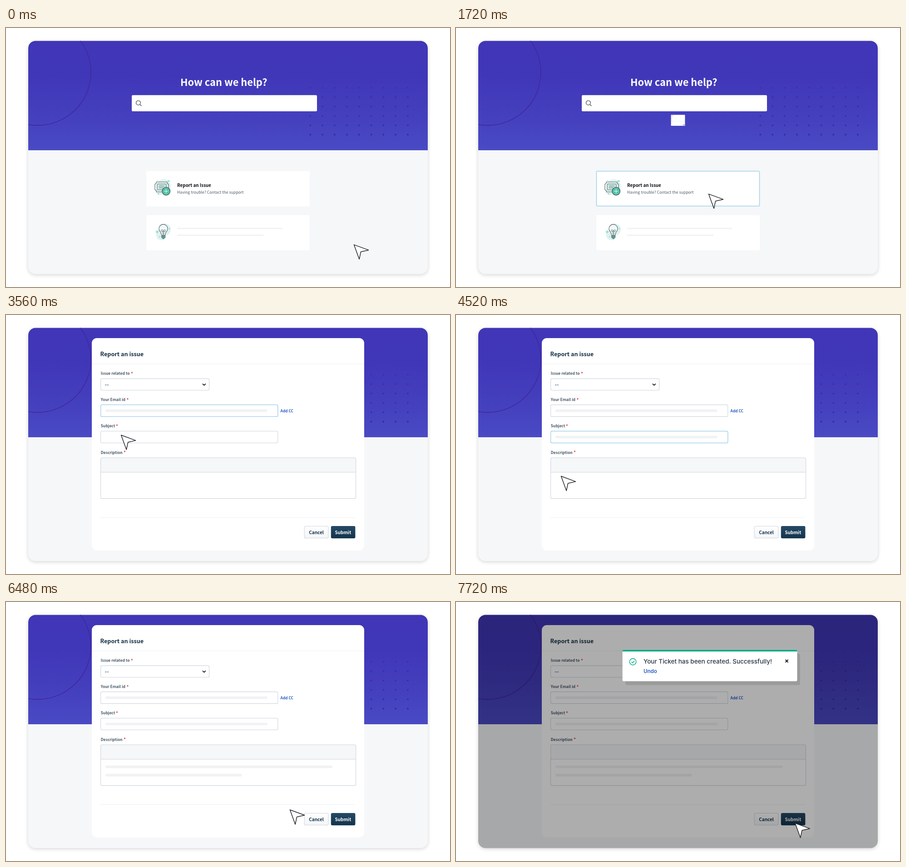
Recreate the animation shown at these times as an HTML page with a canvas. Size 978x572 px, loop 8.64 s.

```html
<!DOCTYPE html>
<html lang="en">
<head>
<meta charset="utf-8">
<title>Report an issue</title>
<style>
html, body { margin: 0; width: 100%; height: 100%; overflow: hidden; background: #fff; }
canvas { display: block; width: 978px; height: 572px; }
</style>
</head>
<body>
<canvas id="stage"></canvas>
<script>
const W = 978, H = 572, LOOP = 8640;
const SANS = '"Noto Sans CJK SC", "Noto Sans CJK JP", "Noto Sans CJK", "Noto Sans", sans-serif';
const INTER = 'Inter, Roboto, sans-serif';
const LINE = '#cfd7df', FOCUS = '#a4d2ea', BAR = '#f1f2f3', NAVY = '#12344d';
const INK = '#4b5f66', MINT = '#dff2ef', GREEN = '#55c2a8';

const canvas = document.getElementById('stage');
const dpr = window.devicePixelRatio || 1;
canvas.width = W * dpr;
canvas.height = H * dpr;
const c = canvas.getContext('2d');

const clamp = v => Math.max(0, Math.min(1, v));
const lerp = (a, b, p) => a + (b - a) * p;

function bezier(x1, y1, x2, y2) {
  const at = (a, b, s) => 3 * a * s * (1 - s) ** 2 + 3 * b * s * s * (1 - s) + s ** 3;
  return x => {
    if (x <= 0) return 0;
    if (x >= 1) return 1;
    let lo = 0, hi = 1;
    for (let i = 0; i < 24; i++) {
      const mid = (lo + hi) / 2;
      if (at(x1, x2, mid) < x) lo = mid; else hi = mid;
    }
    return at(y1, y2, lo);
  };
}
const ease = bezier(.25, .1, .25, 1);
const easeInOut = bezier(.42, 0, .58, 1);
const ramp = (t, start, dur) => clamp((t - start) / dur);
const pulse = (t, on, off) => ramp(t, on, 120) * (1 - ramp(t, off, 120));

// ---- drawing helpers ----
function box(x, y, w, h, r, fill, stroke, lw = 1) {
  c.beginPath();
  c.roundRect(x, y, w, h, r);
  if (fill) { c.fillStyle = fill; c.fill(); }
  if (stroke) { c.strokeStyle = stroke; c.lineWidth = lw; c.stroke(); }
}

function dot(x, y, r, fill, stroke, lw = 1) {
  c.beginPath();
  c.arc(x, y, r, 0, Math.PI * 2);
  if (fill) { c.fillStyle = fill; c.fill(); }
  if (stroke) { c.strokeStyle = stroke; c.lineWidth = lw; c.stroke(); }
}

function path(pts, stroke, lw, fill, close) {
  c.beginPath();
  for (let i = 0; i < pts.length; i += 2) c.lineTo(pts[i], pts[i + 1]);
  if (close) c.closePath();
  if (fill) { c.fillStyle = fill; c.fill(); }
  c.strokeStyle = stroke;
  c.lineWidth = lw;
  c.stroke();
}

function text(str, x, y, size, weight, color, family = SANS) {
  c.font = `${weight} ${size}px ${family}`;
  c.fillStyle = color;
  c.fillText(str, x, y);
}

function fade(alpha, draw) {
  if (alpha <= 0) return;
  c.save();
  c.globalAlpha *= alpha;
  draw();
  c.restore();
}

function vertical(y0, y1, ...stops) {
  const g = c.createLinearGradient(0, y0, 0, y1);
  stops.forEach((s, i) => g.addColorStop(i / (stops.length - 1), s));
  return g;
}

// ---- help page ----
function ticketIcon() {
  dot(347, 350, 16, MINT);
  dot(338, 361, 8, MINT);
  path([331, 340, 355, 340, 355, 343, 358, 345, 358, 357, 355, 359, 355, 362,
        331, 362, 331, 359, 328, 357, 328, 345, 331, 343], INK, 1.1, null, true);
  box(333, 344.5, 20, 13, 1, '#cfeae5', INK, .9);
  path([337, 349, 349, 349], INK, 1);
  path([337, 353, 346, 353], INK, 1);
  dot(352.7, 360.5, 8.8, GREEN, '#3d5359', 1.2);
  path([348, 360.5, 357.4, 360.5], '#e8fbf6', 1.1);
  path([352.7, 355.8, 352.7, 365.2], '#e8fbf6', 1.1);
  box(357, 336.5, 3, 3, 0, null, GREEN, .8);
  dot(336, 366, 1.1, GREEN);
  dot(333.5, 337, .8, GREEN);
}

function bulbIcon() {
  dot(350, 445, 13, MINT);
  dot(342, 457, 11.5, MINT);
  c.beginPath();
  c.arc(346.5, 443.2, 9.6, Math.PI * .72, Math.PI * 2.28);
  c.bezierCurveTo(350.8, 454, 350.8, 455, 350.6, 458);
  c.lineTo(342.6, 458);
  c.bezierCurveTo(342.4, 455, 342, 454, 340.4, 450.6);
  c.fillStyle = 'rgba(255,255,255,.55)';
  c.fill();
  c.strokeStyle = INK;
  c.lineWidth = 1.1;
  c.stroke();
  dot(343.9, 447.6, 2, null, INK, .9);
  dot(349.3, 447.6, 2, null, INK, .9);
  path([345.6, 448, 345.6, 457], INK, .9);
  path([347.6, 448, 347.6, 457], INK, .9);
  box(342.8, 458.5, 7.6, 5, 1, GREEN, INK, 1);
  path([343, 461, 350.4, 461], INK, .9);
  path([344.6, 465.3, 348.8, 465.3], INK, 1.4);
  box(331, 448.3, 3.4, 3.4, 0, null, GREEN, 1);
  dot(360, 443, 1, GREEN);
  dot(338.5, 461, .9, GREEN);
}

function page(t) {
  c.save();
  c.shadowColor = 'rgba(0,0,0,.17)';
  c.shadowBlur = 9 * dpr;
  c.shadowOffsetY = 2 * dpr;
  box(49, 28.5, 880, 515, 16, '#f5f7f9');
  c.restore();

  c.save();
  c.beginPath();
  c.roundRect(49, 28.5, 880, 515, 16);
  c.clip();
  c.fillStyle = vertical(28, 270, '#4036b7', '#4037b8', '#443fbd', '#4a4ac4');
  c.fillRect(49, 28, 880, 242);
  dot(70, 98, 117, null, '#41299f', 1.8);
  for (let row = 0; row < 6; row++)
    for (let col = 0; col < 9; col++)
      fade(.45 + row * .1, () =>
        dot(670.3 + col * 26.84, 132 + row * 20.7, 1.9, row < 3 ? '#41209a' : '#332c98'));
  c.restore();

  text('How can we help?', 384, 128, 21.85, 700, '#fff');
  box(277, 148.3, 408, 35.7, 2.5, '#fff');
  dot(291.4, 165.2, 4.9, null, '#4a5157', 1.3);
  path([295, 168.8, 298.4, 172.2], '#4a5157', 1.4);

  box(309, 316, 360, 77.5, 2, '#fff');
  ticketIcon();
  text('Report an Issue', 377, 350.8, 9.85, 700, '#0c0f12');
  text('Having trouble? Contact the support', 377, 366.2, 8.66, 400, '#4d5b68');
  fade(ramp(t, 1290, 130), () => box(309.5, 316.2, 359, 77, 2, null, FOCUS, 1.6));

  box(309, 413.2, 360, 77.5, 2, '#fff');
  bulbIcon();
  box(377, 441.2, 231.5, 3, 1, BAR);
  box(377, 456.2, 190, 3, 1, BAR);
}

// ---- form ----
function label(str, y, starX) {
  text(str, 208.8, y, 8.45, 600, '#475867');
  text('*', starX, y + .8, 9.5, 600, '#e0353c');
}

function field(y, w, h, focus) {
  box(208.6, y, w, h, 3, null, LINE, 1.1);
  fade(focus, () => box(208.6, y, w, h, 3, null, FOCUS, 1.3));
}

function form(t) {
  box(189, 51, 600, 469, 11, '#fff');
  text('Report an issue', 207.5, 90.8, 12.64, 700, '#183247');
  path([189, 108, 789, 108], '#edf0f2', 1);

  label('Issue related to', 132.3, 275);
  field(140.6, 239, 25.6, 0);
  text('--', 217.6, 157.6, 13, 500, '#183247');
  path([433, 151.8, 436.4, 155.2, 439.8, 151.8], '#15181b', 1.8);

  label('Your Email id', 190.4, 265.5);
  field(198.4, 390.2, 26, pulse(t, 3020, 3940));
  text('Add CC', 604.6, 215, 8.3, 600, '#2c5cc5');
  fade(ramp(t, 3040, 160), () => box(219, 208.6, 356.5, 5.6, 2, BAR));

  label('Subject', 248.4, 242);
  field(256.5, 390.2, 26, pulse(t, 3900, 4860));
  fade(ramp(t, 3940, 160), () => box(219, 266.7, 356.5, 5.6, 2, BAR));

  label('Description', 306.6, 259);
  box(208.6, 315.2, 562, 32, [3, 3, 0, 0], '#f5f7f9');
  path([208.6, 347.2, 770.6, 347.2], LINE, 1.1);
  field(315.2, 562, 90.2, pulse(t, 4800, 6110));
  const full = t >= 5640;
  fade(ramp(t, 4900, 540), () => box(219, 361.2, full ? 500 : 226, 5.6, 2, BAR));
  if (t >= 5760) box(219, 379.6, 300.5, 5.6, 2, BAR);

  path([208, 447.6, 769, 447.6], '#ebeef0', 1);
  box(657.2, 466.5, 52.8, 26.3, 3, vertical(466, 493, '#fff', '#f3f5f7'), LINE, 1.1);
  text('Cancel', 667.3, 483.6, 9.97, 700, NAVY);
  box(715.8, 466, 53.6, 27.2, 3, vertical(466, 493, '#264966', NAVY));
  text('Submit', 724.4, 483.6, 10, 700, '#fff');
}

function modal(t) {
  const p = easeInOut(ramp(t, 1630, 570));
  if (p <= 0) return;
  c.save();
  c.translate(489, lerp(199.5, 285.5, p));
  c.scale(p, p);
  c.translate(-489, -285.5);
  form(t);
  c.restore();
}

// ---- confirmation ----
function toast(t) {
  fade(ease(ramp(t, 6992, 800)), () => {
    box(49, 28.5, 880, 515, 16, 'rgba(0,0,0,.32)');
    box(373.3, 114, 384.6, 69.5, 3, 'rgba(0,0,0,.1)');
    box(366.7, 105.6, 384.8, 69.4, 3, '#fff');
    box(366.7, 105.6, 384.8, 3.6, [3, 3, 0, 0], '#00a886');
    dot(389.6, 132, 7.2, null, '#00a886', 1.4);
    path([386.4, 132.2, 388.7, 134.5, 393, 129.8], '#00a886', 1.4);
    text('Your Ticket has been created. Successfully!', 413, 135.6, 13.5, 500, '#26323d', INTER);
    text('Undo', 413, 157.4, 11.6, 600, '#2c5cc5', INTER);
    path([725.6, 127.4, 731.6, 133.4], '#111', 1.9);
    path([731.6, 127.4, 725.6, 133.4], '#111', 1.9);
  });
}

// ---- pointer: start time, then where it goes ----
const moves = [
  [510, 556, 366],
  [2219, 228, 211],
  [3102, 257, 273],
  [3985, 229, 362],
  [6109, 746.5, 488]
];

function pointer(t) {
  let x = 766, y = 478;
  for (const [start, nx, ny] of moves) {
    const p = ease(ramp(t, start, 800));
    x = lerp(x, nx, p);
    y = lerp(y, ny, p);
  }
  c.save();
  c.translate(x, y);
  path([.5, .6, 32.6, 12.4, 15.6, 16.3, 12.1, 32.6], '#23272b', 1.5, '#fff', true);
  c.restore();
}

function frame(now) {
  const t = now % LOOP;
  c.setTransform(dpr, 0, 0, dpr, 0, 0);
  c.lineJoin = 'round';
  c.fillStyle = '#fff';
  c.fillRect(0, 0, W, H);
  page(t);
  modal(t);
  toast(t);
  pointer(t);
}

const begin = performance.now();
function tick() {
  frame(performance.now() - begin);
  requestAnimationFrame(tick);
}
tick();
</script>
</body>
</html>
```
